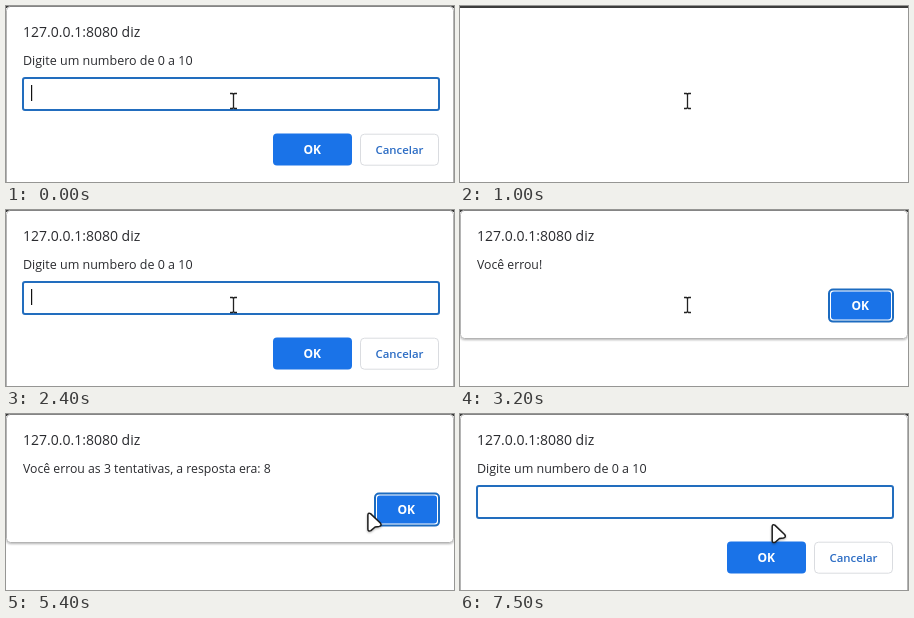
These frames come from a looping animation (448x176 px, 8000 ms). An HTML page:

```html
<!DOCTYPE html>
<html lang="pt-BR">
<head>
<meta charset="utf-8">
<title>Jogo de adivinhar</title>
<style>
html, body { margin: 0; width: 100%; height: 100%; overflow: hidden; background: #fff; }
svg { display: block; width: 448px; height: 176px; }
text { font-family: "Open Sans", "Noto Sans", sans-serif; fill: #2a2b2f; }
.title { font-size: 14px; }
.body { font-size: 12.5px; }
.message { font-size: 12.25px; }
.btn { font-size: 11.4px; font-weight: 600; text-anchor: middle; }
.ok { font-size: 12px; font-weight: 700; fill: #fff; }
.cancel { fill: #2b6cc4; }
.box { fill: #fff; stroke: #b4b4b4; }
.blue { fill: #1a73e8; }
</style>
</head>
<body>
<svg viewBox="0 0 448 176">
  <defs>
    <filter id="soft" x="-20%" y="-20%" width="140%" height="140%">
      <feDropShadow dx="0" dy="1" stdDeviation="1.2" flood-opacity=".3"/>
    </filter>
  </defs>
  <rect width="448" height="176" fill="#fff"/>
  <rect width="448" height="2" fill="#3c3c3c"/>

  <g id="prompt">
    <rect class="box" x=".5" y=".5" width="447" height="190" rx="4"/>
    <path d="M4 .5H444" stroke="#858585"/>
    <text class="title" x="17" y="31">127.0.0.1:8080 diz</text>
    <text class="body" x="17" y="59">Digite um numbero de 0 a 10</text>
    <rect x="17" y="72" width="416" height="32" rx="2" fill="#fff" stroke="#226dbe" stroke-width="2"/>
    <text id="digit" class="body" x="25" y="92">5</text>
    <rect id="caret" y="79" width="1.2" height="16" fill="#111"/>
    <rect class="blue" x="267" y="127.6" width="79" height="32" rx="4"/>
    <text class="btn ok" x="306.3" y="148">OK</text>
    <rect x="354.5" y="128.2" width="78" height="31" rx="4" fill="#fff" stroke="#dadce0"/>
    <text class="btn cancel" x="393.5" y="148">Cancelar</text>
  </g>

  <g id="alert">
    <rect class="box" x=".5" y=".5" width="447" height="128" rx="4" filter="url(#soft)"/>
    <path d="M4 .5H444" stroke="#858585"/>
    <text class="title" x="17" y="31">127.0.0.1:8080 diz</text>
    <text id="message" class="message" x="17" y="59"></text>
    <rect x="369" y="79.6" width="64" height="32" rx="4" fill="#fff" stroke="#1c6bc0" stroke-width="2"/>
    <rect class="blue" x="371" y="81.6" width="60" height="28" rx="3"/>
    <text class="btn ok" x="400.3" y="100">OK</text>
  </g>

  <path id="beam" d="M224 87.5h2.5l1 1 1-1h2.5M227.5 88v14M224 102.5h2.5l1-1 1 1h2.5" fill="none" stroke="#222" stroke-width="1.3"/>
  <path id="arrow" d="M1 3.2Q1 .4 3.6 1.6L13.4 11Q15.4 13.8 12.2 14.4L8.2 15 4 18.7Q1 20 1 17Z" fill="#fff" stroke="#1c1c1c" stroke-width="1.5" stroke-linejoin="round" filter="url(#soft)"/>
</svg>
<script>
const LOOP = 8000, FADE = 100, LAST_TRY = 3300;
const LOST = "Você errou as 3 tentativas, a resposta era: 8";

// Each scene fades into the next; a prompt may get its answer typed
const scenes = [
  { from: -FADE, view: "prompt", typed: 100 },
  { from: 200, view: "alert" },
  { from: 900, view: "page" },
  { from: 1100, view: "prompt", typed: 1500 },
  { from: 1800, view: "alert" },
  { from: 2300, view: "prompt", typed: 2500 },
  { from: 2700, view: "alert" },
  { from: 5800, view: "page" },
  { from: 6950, view: "prompt" },
];

const el = id => document.getElementById(id);
const show = (id, on) => el(id).setAttribute("visibility", on ? "visible" : "hidden");
const progress = (t, from, length) => Math.min(1, Math.max(0, (t - from) / length));
const easeOut = p => 1 - (1 - p) ** 2;
const mix = (a, b, p) => a + (b - a) * p;

function drawDialogs(t) {
  const i = scenes.findLastIndex(s => t >= s.from);
  const now = scenes[i], before = scenes[i - 1];
  const p = progress(t, now.from, FADE);
  for (const view of ["prompt", "alert"]) {
    const opacity = now.view === view ? p : before?.view === view ? 1 - p : 0;
    el(view).setAttribute("opacity", opacity);
  }
  const form = now.view === "prompt" ? now : before;
  const typed = t >= form?.typed;
  show("digit", typed);
  show("caret", t < 7500);
  el("caret").setAttribute("x", typed ? 32 : 25);
  el("message").textContent = t < LAST_TRY ? "Você errou!" : LOST;
}

function drawPointer(t) {
  const go = easeOut(progress(t, 4950, 650));
  const back = progress(t, 5780, 420);
  const x = mix(mix(224.4, 375, go), 311.2, back);
  const y = mix(mix(93, 98.5, go), 109.5, back);
  show("beam", t < LAST_TRY);
  show("arrow", t >= LAST_TRY);
  el("arrow").setAttribute("transform", `translate(${x} ${y})`);
}

const start = performance.now();
function tick() {
  const t = (performance.now() - start) % LOOP;
  drawDialogs(t);
  drawPointer(t);
  requestAnimationFrame(tick);
}
tick();
</script>
</body>
</html>
```
